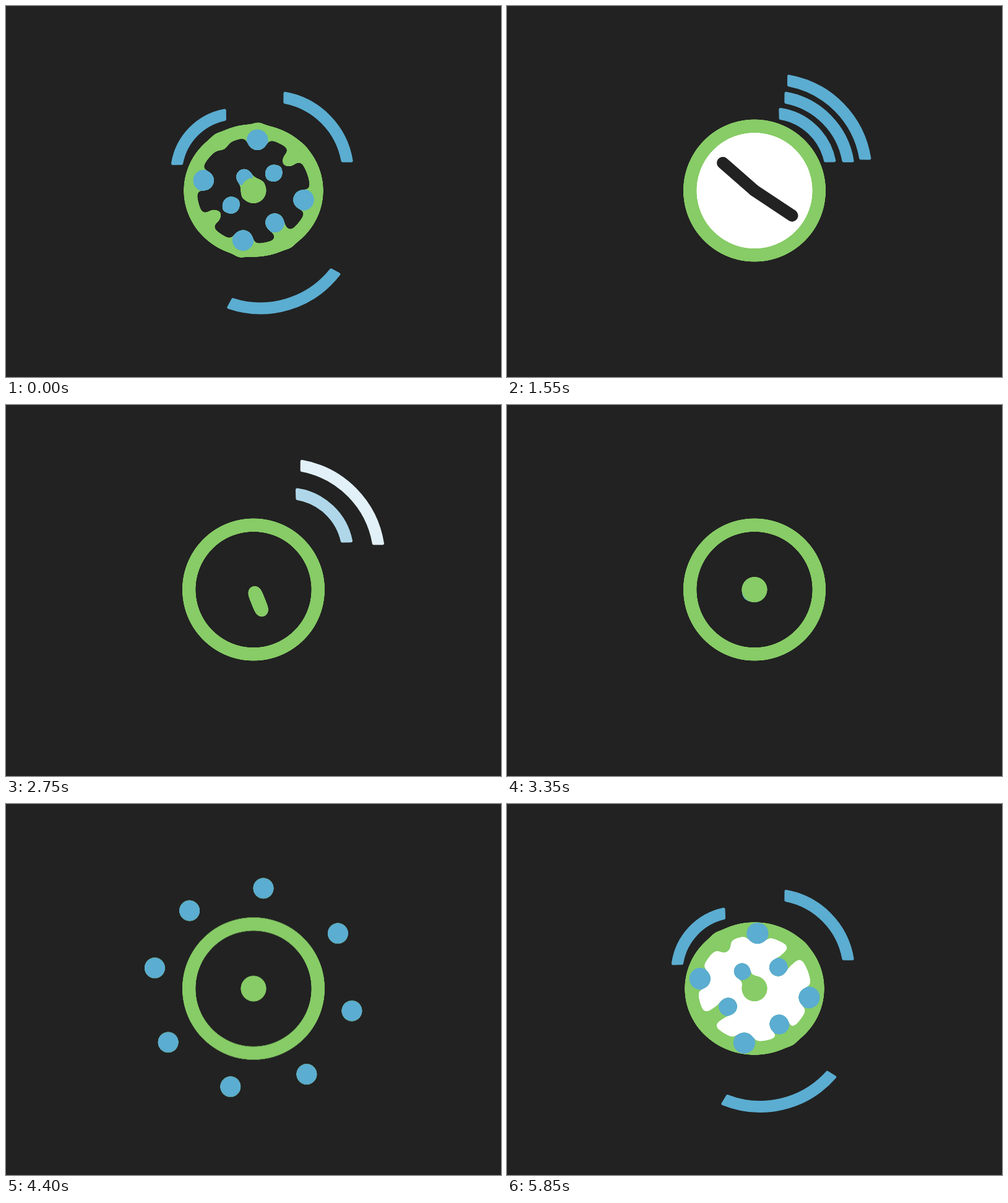
An HTML page for the animation above (5900 ms loop, 800 by 600 pixels).

```html
<!DOCTYPE html>
<html>
<head>
<meta charset="utf-8">
<style>
html, body { margin: 0; width: 100%; height: 100%; overflow: hidden; background: #222; }
svg { display: block; width: 800px; height: 600px; }
mask { mask-type: alpha; }
</style>
</head>
<body>
<svg viewBox="0 0 800 600">
  <filter id="goo" filterUnits="userSpaceOnUse" x="-200" y="-200" width="400" height="400">
    <feGaussianBlur stdDeviation="5.5"/>
    <feColorMatrix values="1 0 0 0 0  0 1 0 0 0  0 0 1 0 0  0 0 0 26 -12.5" result="shape"/>
    <feFlood flood-color="#87cc66"/>
    <feComposite in2="shape" operator="in"/>
  </filter>
  <g id="scene" transform="translate(400 298.5)"></g>
</svg>
<script>
const LOOP = 5900, START = 3050;
const RING = 104.5, ORBIT = 163;
const GREEN = '#87cc66', BLUE = [91, 173, 209], DARK = '#222';
const scene = document.getElementById('scene');
const rad = a => a * Math.PI / 180;
const mix = (a, b, x) => a + (b - a) * x;
const ease = x => .5 - .5 * Math.cos(Math.PI * Math.min(1, Math.max(0, x)));
const ramp = (t, from, to) => ease((t - from) / (to - from));

const circle = r => `<circle r="${r}" fill="${GREEN}"/>`;

const capsule = (angle, r1, r2, width, color) =>
  `<line transform="rotate(${angle})" x1="${r1}" x2="${r2}" stroke="${color}" stroke-width="${width}" stroke-linecap="round"/>`;

// Curved bar around its own centre, with ends cut at 45 degrees to its axis
function bar(R, color) {
  const half = 36 - 2.5 / R * 57.3;
  const s = 7 / Math.cos(rad(45 - half)) * Math.SQRT1_2;
  const x = R * Math.cos(rad(half)), y = R * Math.sin(rad(half));
  const outer = Math.hypot(x + s, y + s), inner = Math.hypot(x - s, y - s);
  return `<path fill="${color}" stroke="${color}" stroke-width="5" stroke-linejoin="round"
    d="M${x + s} ${-y - s}A${outer} ${outer} 0 0 1 ${x + s} ${y + s}
    L${x - s} ${y - s}A${inner} ${inner} 0 0 0 ${x - s} ${s - y}Z"/>`;
}

// Three bars leave the ring, swing to the upper right, pulse and fade to white
function waves(t) {
  if (t < 5000) return '';
  const out = ramp(t, 5000, 5500), scale = mix(.82, 1, out);
  return [-139, -44.5, 88].map((from, i) => {
    const R = 97 + 28 * i;
    const to = i ? -44.5 : -46.5;
    const turn = mix(from, to, ramp(t, 5700 - 100 * i, 7350));
    const late = 25 * (2 - i), fadeStart = 7950 + 160 * ((i + 2) % 3);
    const white = ramp(t, fadeStart, fadeStart + 750);
    if (white > .95) return '';
    const pulse = 64 * (ramp(t - late, 7600, 8400) - ramp(t - late, 8400, 8900));
    const offset = mix(RING - .82 * R, 39, out) + pulse;
    const color = `rgb(${BLUE.map(c => Math.round(mix(c, 255, white)))})`;
    return `<g transform="rotate(${turn}) translate(${offset})">${bar(R * scale, color)}</g>`;
  }).join('');
}

// Eight dots fly out of the hub, orbit, and fall back in; even ones are quicker
function dots(t) {
  let goo = '', top = '';
  const s = (t - 4400) / 1000;
  const turn = 275.6 + 20.4 * s + 16.9 * (1 - Math.exp(-s));
  const stretch = 1 - ramp(t, 3700, 3980);
  for (let i = 0; i < 8; i++) {
    const pull = i % 2 ? 0 : 2 - Math.sin(i * Math.PI / 4);
    const a = turn + 45 * i + 7.6 * Math.sin(i * Math.PI / 7) ** .25;
    const out = ease(.52 + .028 * pull + (t - 3700) / 700);
    const back = ease(.13 + .035 * pull + (t - 5250) / 600 * (.34 + .04 * pull));
    const r = ORBIT * out * (1 - back);
    // The ring is drawn inwards after a passing dot, then recoils
    if (t > 5500 && t < 6900 && r < 88)
      goo += capsule(a, 100, Math.min(100, Math.max(119 - r, r)), 23, GREEN);
    if (r < 2) continue;
    const size = Math.min(16.5, 11.3 + .06 * r);
    const blob = (grow, fill) => `<ellipse transform="rotate(${a})" cx="${r}"
      rx="${size + 6 * stretch + grow}" ry="${size + 1.5 * stretch + grow}" fill="${fill}"/>`;
    goo += blob(.9, GREEN);
    top += blob(1.2, `rgb(${BLUE})`);
  }
  return { goo, top };
}

function hands(t, color) {
  if (t < 6600) return '';
  const grow = ramp(t, 6600, 7150) - ramp(t, 8350, 8950);
  const since = (t - 7450) / 1000, width = mix(19.5, 23, ramp(t, 8200, 8650));
  const hand = (angle, length) =>
    capsule(angle, Math.min(10 * (1 - grow), length * grow), length * grow, width, color);
  return hand(221 + 172.5 * since, 68) + hand(33.6 + 28.7 * since, 73);
}

function draw(now) {
  let t = now % LOOP;
  if (t < START) t += LOOP;
  const clock = t >= 7000 && t < 8100;
  const lit = clock || t >= 5850 && t < 5900;
  const squash = ramp(t, 5400, 5750) * (1 - ramp(t, 5950, 6350));
  const oval = `<ellipse rx="${RING * (1 - .022 * squash)}" ry="${RING * (1 - .075 * squash)}"`;
  const hub = 11.5 + 9 * ramp(t, 3050, 3250) - 15.5 * ramp(t, 6500, 6900);
  const { goo, top } = dots(t);
  scene.innerHTML = waves(t)
    + (lit ? oval + ' fill="#fff"/>' : '')
    + `<g id="body" filter="url(#goo)">${oval} fill="none" stroke="${GREEN}" stroke-width="21.5"/>`
    + (clock ? '' : circle(hub + .7) + hands(t, GREEN)) + goo + '</g>'
    + `<mask id="skin" maskUnits="userSpaceOnUse" x="-200" y="-200" width="400" height="400"><use href="#body"/></mask>`
    + `<g mask="url(#skin)">${top}</g>`
    + (clock ? hands(t, DARK) : hub > 11 ? circle(hub) : '');
}

const begin = performance.now();
(function tick() {
  draw(performance.now() - begin);
  requestAnimationFrame(tick);
})();
</script>
</body>
</html>
```
